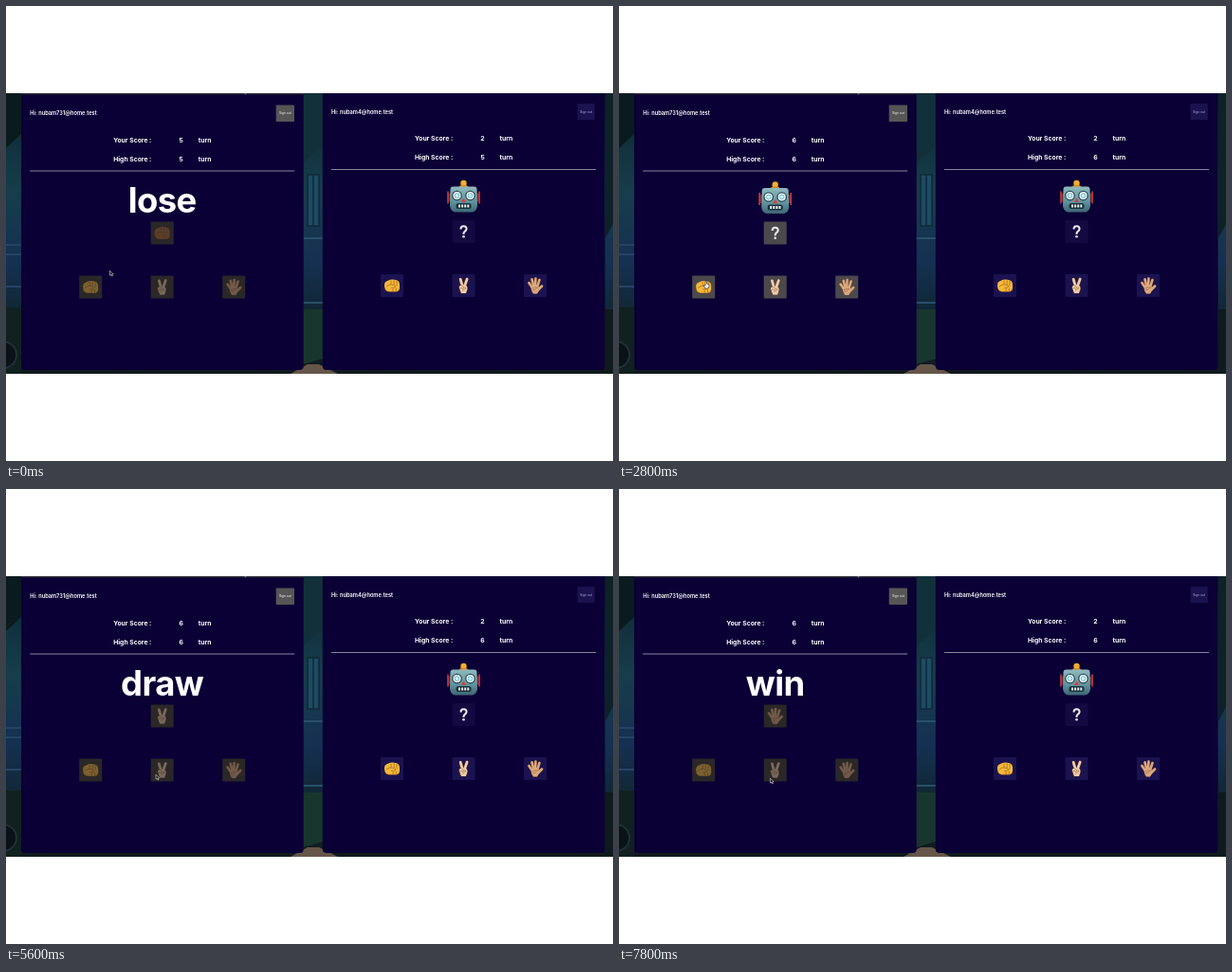
An HTML page for the animation above (8 s loop, 640x480 px).

```html
<!DOCTYPE html>
<html lang="en">
<head>
<meta charset="utf-8">
<title>Rock paper scissors</title>
<style>
  html, body { margin: 0; width: 100%; height: 100%; overflow: hidden; background: #fff; }
  svg { display: block; width: 100vw; height: 100vh; }
  text { font-family: Inter, "Liberation Sans", sans-serif; font-weight: 700; fill: #fff; }
  .user { font-size: 5.7px; font-weight: 600; }
  .score { font-size: 6.8px; }
  .sign { font-size: 3.3px; font-weight: 400; text-anchor: middle; }
  .result { font-size: 36.5px; letter-spacing: -.6px; text-anchor: middle; }
  .edge { stroke: #70401c; stroke-opacity: .65; }
  .skin { stroke: currentColor; }
  .fist { color: #f7b838; }
  .peace { color: #efcda9; }
  .palm { color: #dba87e; }
  .brown { color: #a4612c; }
  .left .tile { fill: #4b494c; }
  .left .icon { opacity: 1; }
  .left.locked .tile { fill: #2a2728; }
  .left.locked .icon { opacity: .4; }
  .right .tile { fill: #1b1250; }
  .right .tile.guess { fill: #140941; }
</style>
</head>
<body>
<svg id="stage" viewBox="0 0 640 480" preserveAspectRatio="none">
  <defs>
    <linearGradient id="night" x2="0" y2="1">
      <stop offset="0" stop-color="#0b252e"/>
      <stop offset=".35" stop-color="#173d4b"/>
      <stop offset=".6" stop-color="#153052"/>
      <stop offset=".82" stop-color="#10252d"/>
      <stop offset="1" stop-color="#101a1e"/>
    </linearGradient>
    <linearGradient id="metal" x2="0" y2="1">
      <stop offset="0" stop-color="#8fb9bd"/>
      <stop offset=".6" stop-color="#5f929d"/>
      <stop offset="1" stop-color="#3d6673"/>
    </linearGradient>
    <g id="fist">
      <path d="M-8-1Q-8-4-5-5L-2-6.2Q1-7 5-5.8Q8-4.5 8-1V3Q8 6 4.5 6.4H-3Q-8 6-8 1Z" fill="currentColor"/>
      <g class="edge" fill="none" stroke-width=".75">
        <path d="M-6 1Q-3-2 0-1L3 0Q4.5 1 3 2L-1 2.4"/>
        <path d="M-1-5.5V-1.5M2.2-5.8V-1M5-5.2V.5M1 3V6M4.3 2.5V6M-8 1Q-8 6-3 6.4H4.5Q8 6 8 3"/>
      </g>
    </g>
    <g id="peace" fill="none" stroke-linecap="round" stroke-linejoin="round">
      <path id="vFingers" class="edge" stroke-width="3.6" d="M-1.2 1-3.3-6.7M.8 1 3.6-6.9"/>
      <path class="edge" stroke-width="1" d="M-4.8 2Q-5 0-3 0H2Q4.2 0 4 3.5L2.5 8H-2.5Z" fill="currentColor"/>
      <path class="skin" stroke-width="2.7" d="M-1.2 1-3.3-6.7M.8 1 3.6-6.9"/>
      <path d="M-4.5 2Q-4.8 0-3 0H2Q4 0 3.7 3.5L2.3 8H-2.3Z" fill="currentColor"/>
      <path class="edge" stroke-width=".7" d="M-4 3Q-2 1-1 3.3M-1 3Q1 1 2.5 2.5Q1 4-1 5M-3-1 0 1.5"/>
    </g>
    <g id="palm" fill="none" stroke-linecap="round" stroke-linejoin="round">
      <path class="edge" stroke-width="3.3" d="M-2.5 3-6.6-3M-1.5 1-3.5-6.6M0 1 .4-7.4M2 2 4.4-6M2.5 5 7 .5"/>
      <path class="edge" stroke-width="1" d="M-4 1Q0-2 3 0L4 4Q3 7 2 8.4H-2Q-5 5-4 1Z" fill="currentColor"/>
      <path class="skin" stroke-width="2.5" d="M-2.5 3-6.6-3M-1.5 1-3.5-6.6M0 1 .4-7.4M2 2 4.4-6M2.5 5 7 .5"/>
      <path d="M-4 1Q0-2 3 0L4 4Q3 7 2 8.2H-2Q-4.5 5-4 1Z" fill="currentColor"/>
      <path class="edge" stroke-width=".6" d="M-3 3Q0 1 2.5 2M-2.5 5Q0 5 1.5 2.8"/>
    </g>
    <g id="question" fill="none" stroke="#e8e6f2" stroke-width="2.1">
      <path d="M-3-2.6Q-3-5.8 0-5.8T3-3Q3-1.4 1.4-.3T0 2.9"/>
      <circle cy="5.2" r="1.3" fill="#e8e6f2" stroke="none"/>
    </g>
    <g id="robot">
      <path d="M0-10V-14" stroke="#7c8c90" stroke-width="3"/>
      <circle cy="-14.5" r="3.2" fill="#f3ae2c"/>
      <path d="M-5-10.5Q-4-12.7 0-12.7T5-10.5Z" fill="#d98a22"/>
      <rect x="-17" y="-4" width="34" height="9" rx="1.5" fill="#6c262f"/>
      <path d="M-16.5-6V7M16.5-6V7" stroke="#c53b42" stroke-width="1.6"/>
      <path d="M-11-11H11Q14-11 14-8L14.5 9Q14 15 9 16H-9Q-14 15-14.5 9L-14-8Q-14-11-11-11Z" fill="url(#metal)"/>
      <g fill="#fff" stroke="#264a58" stroke-width="1.3">
        <circle cx="-7" cy="-1.5" r="4.7"/><circle cx="7" cy="-1.5" r="4.7"/>
      </g>
      <g fill="#c9f0f5" stroke="#53a9bd" stroke-width=".8">
        <circle cx="-7" cy="-1.5" r="2.4"/><circle cx="7" cy="-1.5" r="2.4"/>
      </g>
      <path d="M0 1 2.6 5.2H-2.6Z" fill="#dc3b39"/>
      <rect x="-8" y="6.5" width="16" height="6" rx="2.5" fill="#17313a"/>
      <path d="M-5.5 9.5H6" stroke="#e5eded" stroke-width="3" stroke-dasharray="2 1.1"/>
    </g>
  </defs>

  <rect y="92" width="640" height="296" fill="url(#night)"/>
  <g id="garden">
    <path d="M0 92H16V135L0 150Z" fill="#0a1b20"/>
    <path d="M0 252H16M0 262H16M0 296H16" stroke="#244465" stroke-width="2"/>
    <path d="M0 318H16V388H0Z" fill="#10211f"/>
    <circle cx="-3" cy="368" r="14" fill="#0a1218" stroke="#203036" stroke-width="2"/>
    <path d="M313 92H334V148L313 165Z" fill="#123039"/>
    <path d="M318 178H330V232H318ZM324 178V232" fill="#1d4b63" stroke="#102a38" stroke-width="1.5"/>
    <path d="M313 245H334M313 313H334" stroke="#275168" stroke-width="2"/>
    <path d="M313 320H334V372L313 378Z" fill="#18362d"/>
    <path d="M300 388 318 378H330L350 388Z" fill="#66564a"/>
    <path d="M632 92H640V230L632 245Z" fill="#0c2228"/>
    <path d="M632 320H640V388H632Z" fill="#0e1a1d"/>
  </g>
  <g id="panels"></g>
  <g id="cursor">
    <path id="arrow" d="M-1.6-2.8V2.2L-.4 1.2.5 3 1.4 2.6.6.9H2.1Z" fill="#111" stroke="#ddd" stroke-width=".6"/>
    <path id="pointer" d="M-1-3.5Q0-4.2.5-3V-1L3 0V2L2 4H-1L-2.8 1-2 .4-1 1Z" fill="#eee" stroke="#222" stroke-width=".6"/>
  </g>
</svg>
<script>
const LOOP = 8000, STEP = 200;
const $ = id => document.getElementById(id);

const use = (id, x, y, cls = id) =>
  `<use href="#${id}" class="icon ${cls}" x="${x}" y="${y}"/>`;
const tile = (x, y, cls = "") =>
  `<rect class="tile ${cls}" x="${x - 12}" y="${y - 12}" width="24" height="24" rx=".8"/>`;

function scoreRow(label, x, y, id, value) {
  return `<g class="score"><text x="${x - 51.5}" y="${y}">${label}</text>
    <text id="${id}" x="${x + 20}" y="${y}" text-anchor="middle">${value}</text>
    <text x="${x + 38}" y="${y}">turn</text></g>`;
}

// x is the panel's centre, y the top of its content
function panel(side, x, y, user, score, button, label) {
  const choices = ["fist", "peace", "palm"].map((name, i) => {
    const cx = x + (i - 1) * 75.5;
    return tile(cx, y + 203) + use(name, cx, y + 203);
  }).join("");
  return `<g id="${side}" class="${side}">
    <path d="M${x - 148.7} ${y}H${x + 149}V380Q${x + 149} 384 ${x + 145} 384H${x - 144.7}Q${x - 148.7} 384 ${x - 148.7} 380Z" fill="#0b0035"/>
    <text class="user" x="${x - 139.5}" y="${y + 21.5}">Hi: ${user}</text>
    <rect x="${x + 120}" y="${y + 11}" width="${button.w}" height="${button.h}" rx=".8" fill="${button.fill}"/>
    <text class="sign" x="${x + 120 + button.w / 2}" y="${y + 12 + button.h / 2}" style="fill:${button.ink}">${label}</text>
    ${scoreRow("Your Score :", x, y + 50.2, side + "Score", score)}
    ${scoreRow("High Score :", x, y + 70.2, side + "High", 5)}
    <path d="M${x - 139.5} ${y + 80.5}H${x + 139.5}" stroke="#9995aa" stroke-width=".9"/>
    <g id="${side}Robot">${use("robot", x, y + 109.5)}</g>
    <text id="${side}Result" class="result" x="${x}" y="218"></text>
    ${tile(x, y + 146, "guess")}
    <g id="${side}Guess">${use("question", x, y + 146)}</g>
    ${choices}</g>`;
}

$("panels").innerHTML =
  `<path d="M16 92H313.5V96H16Z" fill="#292b34"/><circle cx="252.5" cy="92.8" r=".9" fill="#7184b2"/>` +
  panel("left", 164.7, 93.5, "nubam731@home.test", 5, { w: 19.3, h: 17.5, fill: "#575556", ink: "#fff" }, "Sign out") +
  panel("right", 482.5, 92, "nubam4@home.test", 2, { w: 18.3, h: 17, fill: "#1b1250", ink: "#b5addd" }, "Sign out");

// [start, result, opponent's move, colour class]; no result means waiting for a move
const rounds = [
  [0, "lose", "fist", "brown"], [600],
  [1000, "win", "peace", "peace"], [2800],
  [3200, "lose", "palm", "palm"], [5000],
  [5400, "draw", "peace", "peace"], [7200],
  [7600, "win", "palm", "palm"]
];

const path = [
  [0, 111, 282], [600, 92, 294], [1400, 91, 294], [2000, 103, 253],
  [2800, 92, 294], [3200, 94, 302], [3400, 99, 307], [4200, 120, 306],
  [4800, 154, 304], [5400, 160, 302], [6400, 158, 312],
  [7400, 161, 300], [7800, 161, 308], [LOOP, 161, 308]
];

function pointAt(t) {
  const i = path.findIndex(p => p[0] > t);
  const [t0, x0, y0] = path[i - 1], [t1, x1, y1] = path[i];
  const k = (t - t0) / (t1 - t0);
  return [x0 + (x1 - x0) * k, y0 + (y1 - y0) * k];
}

let shown = -1;
function draw(t) {
  const [start, result = "", move, color] = rounds.filter(r => r[0] <= t).pop();
  const score = t < 2800 ? 5 : 6;
  $("left").classList.toggle("locked", !!result);
  $("leftResult").textContent = result;
  $("leftRobot").style.display = result ? "none" : "";
  $("leftGuess").innerHTML = result
    ? use(move, 164.7, 239.5, color)
    : use("question", 164.7, 239.5);
  for (const id of ["leftScore", "leftHigh", "rightHigh"]) $(id).textContent = score;

  const [x, y] = pointAt(t);
  const hover = y > 284 && y < 305 && (!result || start === 1000 && t < 1400);
  $("cursor").setAttribute("transform", `translate(${x} ${y})`);
  $("arrow").style.display = hover ? "none" : "";
  $("pointer").style.display = hover ? "" : "none";
}

function tick() {
  const t = Math.floor(performance.now() % LOOP / STEP) * STEP;
  if (t !== shown) draw(shown = t);
  requestAnimationFrame(tick);
}
tick();
</script>
</body>
</html>
```
